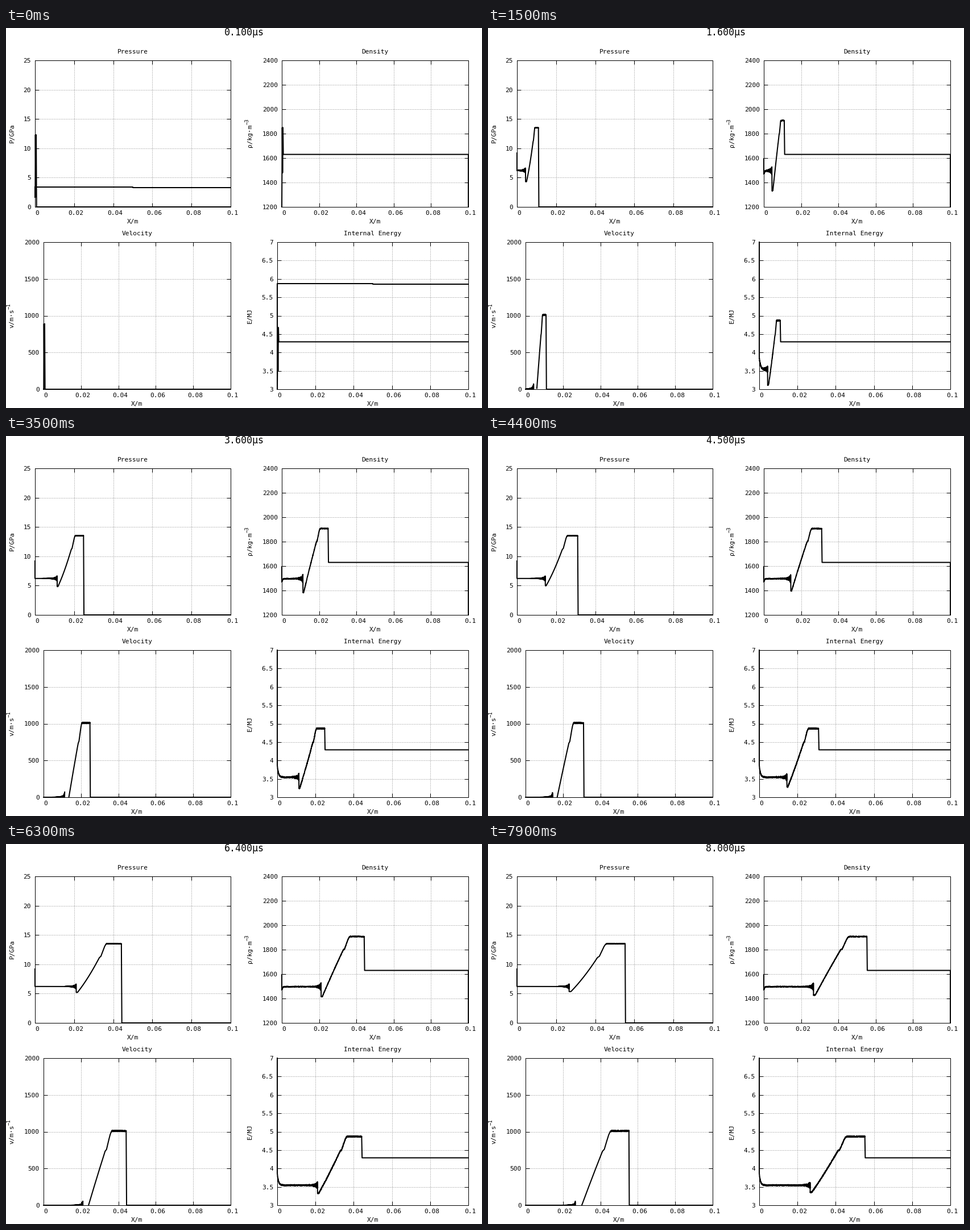
Animation, 837 px wide and 669 px high, one loop 8 s. Source, as a matplotlib script:

```python
import numpy as np
import matplotlib.pyplot as plt
from matplotlib.animation import FuncAnimation

W, H, DPI = 837, 669, 72
FRAMES, STEP = 80, 100
SIZE = 11.07

plt.rcParams["font.family"] = "DejaVu Sans Mono"
fig = plt.figure(figsize=(W / DPI, H / DPI), dpi=DPI, facecolor="white")
ax = fig.add_axes([0, 0, 1, 1])
# whole numbers are pixel edges, so thin lines snap cleanly
ax.set_xlim(0, W)
ax.set_ylim(H, 0)
ax.axis("off")


def label(x, y, s, ha="center", size=SIZE, rot=0):
    return ax.text(x, y, s, ha=ha, va="baseline", fontsize=size,
                   rotation=rot, rotation_mode="anchor", color="black")


def rule(xs, ys, **kw):
    style = dict(color="black", lw=1, solid_capstyle="butt", dash_capstyle="butt")
    ax.plot(xs, ys, **{**style, **kw})


class Panel:
    """A framed plot laid out in stage pixels."""

    def __init__(self, title, left, right, top, bottom, lo, hi, step):
        self.left, self.right = left, right
        self.top, self.bottom = top, bottom
        self.lo, self.hi = lo, hi
        mid = (left + right) / 2
        dots = dict(color="#808080", linestyle=(0, (1, 2)), zorder=1)

        for i in range(6):
            v = i * 0.02
            x = self.px(v)
            if 0 < i < 5:
                rule([x, x], [bottom, top], **dots)
                rule([x, x], [bottom, bottom - 7])
                rule([x, x], [top, top + 7])
            label(x + 3.3, bottom + 14, f"{v:g}")
        for v in np.arange(lo, hi + step / 2, step):
            y = self.py(v)
            if lo < v < hi:
                rule([left, right], [y, y], **dots)
                rule([left, left + 7], [y, y])
                rule([right, right - 7], [y, y])
            label(left - 7, y + 4, f"{v:g}", "right")

        rule([left, right, right, left, left], [top, top, bottom, bottom, top])
        label(mid, top - 12, title)
        label(mid, bottom + 29, "X/m")
        self.curve, = ax.plot([], [], color="black", lw=2, zorder=4)
        self.extra, = ax.plot([], [], color="black", lw=2, zorder=4)

    def px(self, x):
        return self.left + (self.right - self.left) * np.asarray(x) / 0.1

    def py(self, v):
        scale = (self.bottom - self.top) / (self.hi - self.lo)
        return self.bottom - scale * (np.asarray(v) - self.lo)

    def draw(self, x, v):
        self.curve.set_data(self.px(x), self.py(v))

    def draw_extra(self, x, v):
        self.extra.set_data(self.px(x), self.py(v))


pressure = Panel("Pressure", 51, 395, 57, 315, 0, 25, 5)
density = Panel("Density", 485, 813, 57, 315, 1200, 2400, 200)
velocity = Panel("Velocity", 66, 395, 377, 636, 0, 2000, 500)
energy = Panel("Internal Energy", 477, 813, 377, 636, 3, 7, 0.5)

label(14, 185.5, "P/GPa", rot=90)
label(432, 506, "E/MJ", rot=90)
label(432, 210.5, "ρ/kg·m", "left", rot=90)
label(427, 170.5, "−3", "left", SIZE * 0.8, 90)
label(13, 528.5, "v/m·s", "left", rot=90)
label(8, 495, "−1", "left", SIZE * 0.8, 90)
clock = label(418.5, 13, "", size=SIZE * 1.5)

P_TOP, P_WALL, GAMMA = 13.5, 6.22, 3.2
RHO0, E0 = 1630, 4.29
DX = 5e-5
JITTER = np.random.default_rng(4).uniform(-1, 1, 2000)


def isentrope(p):
    """Density, velocity and energy of the expanding gas."""
    r = p / P_TOP
    rho = 1907 * r ** (1 / GAMMA)
    v = 1010 - 4335 * (1 - r ** 0.344)
    return rho, v, 1.661 + 453 * p / rho


def fan(xi, t):
    """Pressure in the rarefaction; xi is x/t in km/s."""
    s = xi - 3.76
    low = np.maximum(6.25 + 3 * s + 0.4 * s * s, 4.3 + 0.65 * np.log(t / 1.6))
    high = np.interp(xi, [5.14, 5.26, 5.55, 5.65, 5.72],
                     [11.15, 11.35, 13.0, 13.4, P_TOP])
    return np.where(xi < 5.14, low, high)


def ignition():
    """First instant: a narrow ringing spike at the left wall."""
    def spike(panel, first, lo, hi, ahead):
        panel.draw([0, 0.0001, 0.0002, 0.0004, 0.0006, 0.0008, 0.1],
                   [first, lo, hi, lo, hi, ahead, ahead])

    spike(pressure, 3.4, 1.7, 12.3, 0)
    spike(density, 1200, 1480, 1850, RHO0)
    spike(velocity, 0, 0, 890, 0)
    spike(energy, 3, 3.5, 4.68, E0)
    density.draw_extra([0.1, 0.1], [RHO0, 1200])
    steps = [0, 0, 0.05, 0.05, 0.1]
    pressure.draw_extra(steps, [1.6, 3.4, 3.4, 3.3, 3.3])
    energy.draw_extra(steps, [3, 5.87, 5.87, 5.855, 5.855])


def detonation(t):
    front = 0.00692 * t
    contact = max(0.00348 * t - 0.0012, 0.0012 * t)
    x = np.arange(0, front - 1e-4, DX)
    n = len(x)
    noise = JITTER[:n]
    flip = (-1.0) ** np.arange(n)
    xi = x / t * 1000
    wall = x < contact
    top = xi > 5.68

    # cell-to-cell ringing that grows towards the contact
    gap = np.maximum(contact - x, 0)
    ring = 0.45 * np.exp(-gap / 0.0005) + 0.55 * np.exp(-gap / 0.0018)
    p = np.where(wall, P_WALL + 0.45 * ring * flip, fan(xi, t))
    rho, v, e = isentrope(p)

    p = p + 0.05 * noise * top
    rho = rho + 3 * noise - 30 * np.exp(-x / 0.0004)
    e = e + 0.018 * noise + 0.32 * np.exp(-x / 0.0006)
    v = v + 9 * noise * top
    v[xi < 3.76] = np.nan
    spread = 0.6 * np.exp(-gap / 0.0003) + 0.4 * np.exp(-gap / 0.0018)
    v[wall] = np.maximum((90 - 4 * t) * spread * flip, 0)[wall]

    xs = np.concatenate([[0], x, [front + 1e-4, 0.1]])

    def full(panel, start, inner, ahead):
        panel.draw(xs, np.concatenate([[start], inner, [ahead, ahead]]))

    full(pressure, 9.2, p, 0)
    full(density, 1595, rho, RHO0)
    full(velocity, 0, v, 0)
    full(energy, 7, e, E0)
    density.draw_extra([0.1, 0.1], [RHO0, 1200])
    for panel in (pressure, energy):
        panel.draw_extra([], [])


def update(i):
    t = (i + 1) / 10
    clock.set_text(f"{t:.3f}µs")
    if i == 0:
        ignition()
    else:
        detonation(t)
    return []


anim = FuncAnimation(fig, update, frames=FRAMES, interval=STEP,
                     repeat=True, repeat_delay=0, blit=False)
plt.show()
```
